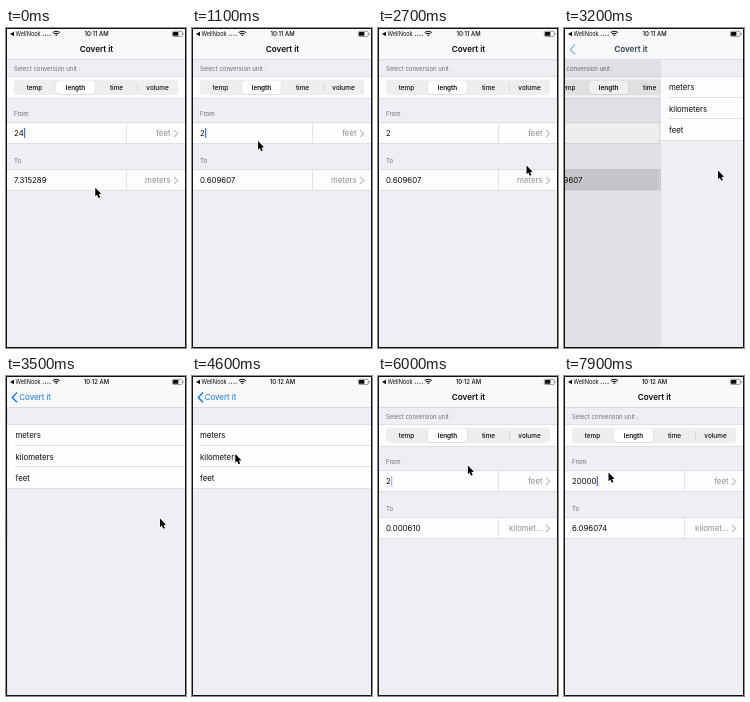
Recreate the animation shown at these times as an HTML page with a canvas. Size 180 px wide and 320 px high, loop 8000 ms.

```html
<!DOCTYPE html>
<html lang="en">
<head>
<meta charset="utf-8">
<style>
html, body { margin: 0; width: 180px; height: 320px; overflow: hidden; }
canvas { display: block; }
</style>
</head>
<body>
<canvas width="180" height="320"></canvas>
<script>
const ctx = document.querySelector('canvas').getContext('2d');
const LOOP = 8000, W = 180, H = 320;
const BG = '#eeeef5', ROW = '#fdfdfe', LINE = '#dedee3', GREY = '#d1d1d5';
const INK = '#0a0a0a', MUTED = '#6d6d72', BLUE = '#0a7aff';
const PUSH = 3113, POP = 5113;

// [time, x, y] of the pointer tip
const pointerPath = [
  [0, 89.5, 160], [100, 66, 123], [300, 66, 123], [600, 66, 113], [1700, 66, 113],
  [1800, 71, 107], [2100, 121, 112], [2200, 121, 112], [2800, 154, 142.5],
  [3600, 154, 142.5], [4000, 59, 91], [4600, 43.3, 78], [5300, 43.3, 78],
  [5800, 102, 86], [6000, 90, 89.5], [6300, 52, 116], [6700, 44.5, 96.5], [LOOP, 44.5, 96.5]
];
const keys = [[0, '24'], [800, '2'], [6900, '20'], [7200, '200'], [7500, '2000'], [7900, '20000']];
const caretResets = [0, 5520, 6900, 7200, 7500, 7900];

const clamp = v => Math.max(0, Math.min(1, v));
const spring = ms => ms <= 0 ? 1 : (1 + ms * .0177) * Math.exp(-ms * .0177);

function rect(x, y, w, h, fill) {
  ctx.fillStyle = fill;
  ctx.fillRect(x, y, w, h);
}

function round(x, y, w, h, r, fill) {
  ctx.fillStyle = fill;
  ctx.beginPath();
  ctx.roundRect(x, y, w, h, r);
  ctx.fill();
}

function text(str, x, y, size = 7.8, color = INK, align = 'left', weight = 400) {
  ctx.font = `${weight} ${size}px Inter, sans-serif`;
  ctx.textAlign = align;
  ctx.textBaseline = 'middle';
  ctx.fillStyle = color;
  ctx.fillText(str, x, y);
  return ctx.measureText(str).width;
}

function stroke(points, color, width) {
  ctx.strokeStyle = color;
  ctx.lineWidth = width;
  ctx.beginPath();
  points.forEach(([x, y]) => ctx.lineTo(x, y));
  ctx.stroke();
}

function faded(alpha, draw) {
  ctx.save();
  ctx.globalAlpha = alpha;
  draw();
  ctx.restore();
}

function shifted(x, draw) {
  ctx.save();
  ctx.translate(x, 0);
  draw();
  ctx.restore();
}

function row(y, h) {
  rect(0, y, W, h, ROW);
  rect(0, y - 1, W, 1, LINE);
  rect(0, y + h, W, 1, LINE);
}

function caretAlpha(t) {
  if (t > 3000 && t < POP) return 0;
  const phase = (t - caretResets.findLast(r => r <= t)) % 1000;
  return phase < 700 ? clamp((600 - phase) / 250) : clamp((phase - 720) / 80);
}

// Returns the x position just after the value
function field(label, value, unit, y) {
  text(label, 8, y - 18.5, 6.1, MUTED);
  const width = text(value, 8, y + .5);
  rect(120, y - 10, 1, 21, '#e2e2e6');
  text(unit, 164.5, y + .5, 7.8, '#8e8e93', 'right');
  stroke([[168, y - 3.2], [171.7, y + .4], [168, y + 4]], '#bcbcc1', 1.1);
  return 8 + width;
}

function converter(t) {
  const inKm = t > POP;
  const value = keys.findLast(k => k[0] <= t)[1];
  const result = (value / 3.2808 / (inKm ? 1000 : 1)).toFixed(6);
  const pressed = t < 3000 ? 0 : clamp(1 - (t - 5250) / 400);

  rect(0, 32, W, 288, BG);
  text('Select conversion unit :', 8, 40.8, 6, MUTED);
  row(49, 21);
  round(8, 52, 164, 15, 4, '#eeeeef');
  round(49.5, 52.7, 40, 14, 3.5, '#dcdcdf');
  round(50, 52.7, 39, 13.3, 3.5, '#fff');
  rect(131, 55, 1, 9, '#d8d8dc');
  ['temp', 'length', 'time', 'volume'].forEach((name, i) =>
    text(name, 28.5 + 41 * i, 60, 6.4, INK, 'center', i === 1 ? 600 : 500));

  row(95, 20);
  row(142, 20);
  faded(pressed, () => rect(0, 141, W, 21, GREY));
  const caretX = field('From', value, 'feet', 105);
  field('To', result, inKm ? 'kilomet...' : 'meters', 152);
  faded(caretAlpha(t), () => rect(caretX + .3, 100, 1.2, 10, '#3f6fe8'));
}

function unitList(t) {
  rect(0, 32, W, 288, BG);
  row(49, 63);
  if (t >= 5000) rect(0, 70, W, 21, GREY);
  ['meters', 'kilometers', 'feet'].forEach((name, i) => {
    if (i) rect(8, Math.floor(48 + 21.3 * i), W, 1, LINE);
    text(name, 8, 60 + 21.2 * i);
  });
}

function statusBar(t) {
  ctx.fillStyle = INK;
  ctx.beginPath();
  ctx.moveTo(4, 6);
  ctx.lineTo(8, 3.7);
  ctx.lineTo(8, 8.3);
  ctx.fill();
  text('WellNook', 9.5, 6, 5.6);
  for (let i = 0; i < 4; i++) rect(36.8 + 2.3 * i, 6.8, .9, .9, INK);
  ctx.strokeStyle = INK;
  ctx.lineWidth = 1.1;
  for (const r of [1, 3, 5]) {
    ctx.beginPath();
    ctx.arc(50.3, 8.2, r, -Math.PI * .75, -Math.PI * .25);
    ctx.stroke();
  }
  text(t < 3400 ? '10:11 AM' : '10:12 AM', 90.5, 6, 5.9, INK, 'center', 500);
  ctx.strokeStyle = '#77777a';
  ctx.lineWidth = .7;
  ctx.beginPath();
  ctx.roundRect(166.3, 3.3, 10, 5.2, 1.4);
  ctx.stroke();
  round(167, 4, 5.4, 3.8, .6, INK);
  rect(176.8, 5, .8, 1.8, '#77777a');
}

function navBar(t, p) {
  rect(0, 0, W, 32, '#f9f8fb');
  rect(0, 31, W, 1, '#d9d9de');
  statusBar(t);
  const titleX = 90.5 - 62 * p ** 1.25;
  const blend = p ** 2;
  faded(1 - blend, () => text('Covert it', titleX, 21.4, 8.1, INK, 'center', 600));
  faded(blend, () => text('Covert it', titleX, 21.4, 7.9, BLUE, 'center'));
  faded(p, () => stroke([[11, 16.5], [6.3, 21.4], [11, 26.3]], BLUE, 1.4));
}

function pointer(t) {
  const i = pointerPath.findIndex(k => k[0] > t);
  const [t0, x0, y0] = pointerPath[i - 1], [t1, x1, y1] = pointerPath[i];
  const f = (t - t0) / (t1 - t0);
  ctx.save();
  ctx.translate(x0 + (x1 - x0) * f, y0 + (y1 - y0) * f);
  ctx.scale(.93, .95);
  ctx.beginPath();
  [[0, 0], [0, 9.2], [2, 7.4], [3.5, 10.8], [5.2, 10], [3.8, 6.8], [6.5, 6.6]]
    .forEach(([x, y]) => ctx.lineTo(x, y));
  ctx.closePath();
  ctx.strokeStyle = '#fff';
  ctx.lineWidth = 1.4;
  ctx.stroke();
  ctx.fillStyle = '#000';
  ctx.fill();
  ctx.restore();
}

function draw(t) {
  const p = t < POP ? 1 - spring(t - PUSH) : spring(t - POP);
  shifted(-.3 * W * p, () => converter(t));
  faded(.13 * p, () => rect(0, 32, W, 288, '#000'));
  if (p > 0) shifted(W * (1 - p), () => unitList(t));
  navBar(t, p);
  ctx.strokeStyle = '#111';
  ctx.lineWidth = 1;
  ctx.strokeRect(.5, .5, W - 1, H - 1);
  pointer(t);
}

const start = performance.now();
function tick() {
  draw((performance.now() - start) % LOOP);
  requestAnimationFrame(tick);
}
tick();
</script>
</body>
</html>
```
